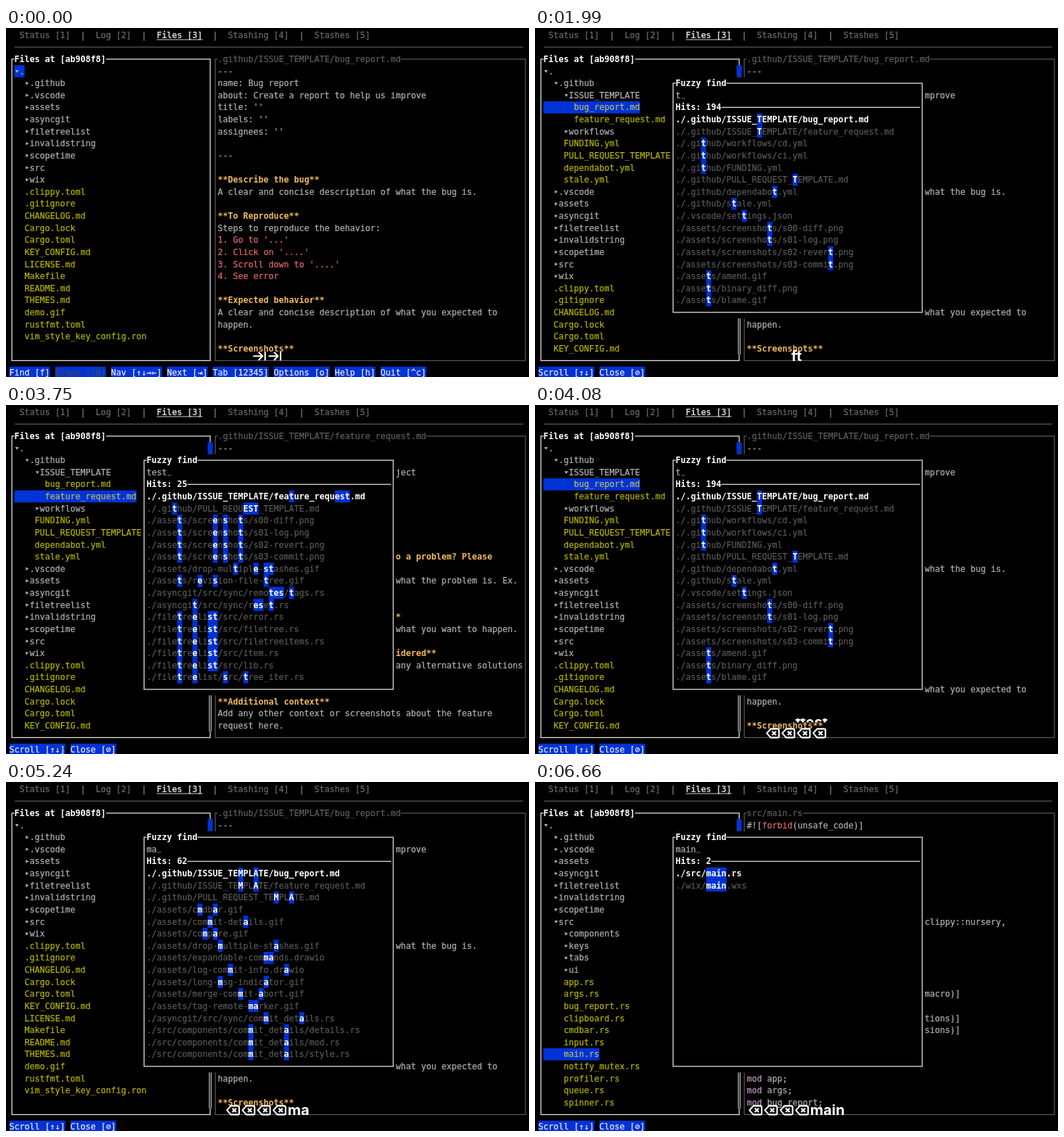
An HTML page that plays this animation: 720 px wide and 481 px high, repeating every 8000 ms.

```html
<!DOCTYPE html>
<html lang="en">
<head>
<meta charset="utf-8">
<title>Fuzzy find</title>
<style>
html, body { margin: 0; width: 100%; height: 100%; overflow: hidden; background: #000; }
svg { display: block; }
#stage { width: 100vw; height: 100vh; }
text { font: 11.63px "DejaVu Sans Mono", monospace; white-space: pre; stroke-width: .2px; }
.b { font-weight: bold; stroke-width: 0; }
.key { font: 700 20px Inter, sans-serif; }
</style>
</head>
<body>
<svg id="stage" viewBox="0 0 720 481"></svg>
<script>
const LOOP = 8000;
const CW = 7, RH = 16.62;
const C = {
  fg: '#b4b4b4', white: '#fff', dim: '#5a5a5a', edge: '#545454', blue: '#0033d6', file: '#b6b600',
  gold: '#f0b95c', red: '#e8686a', violet: '#c39ac3', frame: '#dcdcdc', off: '#3c4668'
};

const trees = {
  top: `v.
 >.github
 >.vscode
 >assets
 >asyncgit
 >filetreelist
 >invalidstring
 >scopetime
 >src
 >wix
 .clippy.toml
 .gitignore
 CHANGELOG.md
 Cargo.lock
 Cargo.toml
 KEY_CONFIG.md
 LICENSE.md
 Makefile
 README.md
 THEMES.md
 demo.gif
 rustfmt.toml
 vim_style_key_config.ron`,
  github: `v.
 v.github
  vISSUE_TEMPLATE
   bug_report.md
   feature_request.md
  >workflows
  FUNDING.yml
  PULL_REQUEST_TEMPLATE.md
  dependabot.yml
  stale.yml
 >.vscode
 >assets
 >asyncgit
 >filetreelist
 >invalidstring
 >scopetime
 >src
 >wix
 .clippy.toml
 .gitignore
 CHANGELOG.md
 Cargo.lock
 Cargo.toml
 KEY_CONFIG.md`,
  assets: `v.
 >.github
 >.vscode
 vassets
  >screenshots
  amend.gif
  binary_diff.png
  blame.gif
  branch-validation.gif
  branches.gif
  by-line-ops.gif
  chars_and_branchname.gif
  checkout-remote.gif
  cmdbar.gif
  commit-details.gif
  commit-msg-length-limit.gif
  compact-tree.png
  compare.gif
  drop-multiple-stashes.gif
  emojified-commit-message.gif
  expandable-commands.drawio
  fuzzy-find.gif
  light-theme.png
  log-commit-info.drawio`,
  src: `v.
 >.github
 >.vscode
 >assets
 >asyncgit
 >filetreelist
 >invalidstring
 >scopetime
 vsrc
  >components
  >keys
  >tabs
  >ui
  app.rs
  args.rs
  bug_report.rs
  clipboard.rs
  cmdbar.rs
  input.rs
  main.rs
  notify_mutex.rs
  profiler.rs
  queue.rs
  spinner.rs`
};

const right = s => ' '.repeat(35) + s;
const docs = {
  bug: ['.github/ISSUE_TEMPLATE/bug_report.md', `---
name: Bug report
about: Create a report to help us improve
title: ''
labels: ''
assignees: ''

---

**Describe the bug**
A clear and concise description of what the bug is.

**To Reproduce**
Steps to reproduce the behavior:
1. Go to '...'
2. Click on '....'
3. Scroll down to '....'
4. See error

**Expected behavior**
A clear and concise description of what you expected to
happen.

**Screenshots**`],
  feature: ['.github/ISSUE_TEMPLATE/feature_request.md', `---
name: Feature request
about: Suggest an idea for this project
title: ''
labels: ''
assignees: ''

---

**Is your feature request related to a problem? Please
describe.**
A clear and concise description of what the problem is. Ex.
I'm always frustrated when [...]

**Describe the solution you'd like**
A clear and concise description of what you want to happen.

**Describe alternatives you've considered**
A clear and concise description of any alternative solutions
or features you've considered.

**Additional context**
Add any other context or screenshots about the feature
request here.`],
  cmdbar: ['assets/cmdbar.gif', 'error loading file: binary file'],
  main: ['src/main.rs', ['#![forbid(unsafe_code)]', '', '', '', '', '', '', '',
    right('clippy::nursery,'), '', '', '', '', '', right('macro)]'), '',
    right('tions)]'), right('sions)]'), '', '', '',
    'mod app;', 'mod args;', 'mod bug_report;'].join('\n')]
};

// Braces mark the matched letters.
const hits = {
  t: [194, `./.github/ISSUE_{T}EMPLATE/bug_report.md
./.github/ISSUE_{T}EMPLATE/feature_request.md
./.gi{t}hub/workflows/cd.yml
./.gi{t}hub/workflows/ci.yml
./.gi{t}hub/FUNDING.yml
./.github/PULL_REQUEST_{T}EMPLATE.md
./.github/dependabo{t}.yml
./.github/s{t}ale.yml
./.vscode/set{t}ings.json
./assets/screensho{t}s/s00-diff.png
./assets/screensho{t}s/s01-log.png
./assets/screenshots/s02-rever{t}.png
./assets/screenshots/s03-commi{t}.png
./asse{t}s/amend.gif
./asse{t}s/binary_diff.png
./asse{t}s/blame.gif`],
  test: [25, `./.github/ISSUE_TEMPLATE/fea{t}ure_requ{est}.md
./.gi{t}hub/PULL_REQU{EST}_TEMPLATE.md
./asse{t}s/scre{e}n{s}ho{t}s/s00-diff.png
./asse{t}s/scre{e}n{s}ho{t}s/s01-log.png
./asse{t}s/scre{e}n{s}ho{t}s/s02-revert.png
./asse{t}s/scre{e}n{s}ho{t}s/s03-commit.png
./assets/drop-mul{t}ipl{e}-{st}ashes.gif
./asse{t}s/r{e}vi{s}ion-file-{t}ree.gif
./asyncgit/src/sync/remo{tes}/{t}ags.rs
./asyncgi{t}/src/sync/r{es}e{t}.rs
./file{t}re{e}li{st}/src/error.rs
./file{t}re{e}li{st}/src/filetree.rs
./file{t}re{e}li{st}/src/filetreeitems.rs
./file{t}re{e}li{st}/src/item.rs
./file{t}re{e}li{st}/src/lib.rs
./file{t}re{e}list/{s}rc/{t}ree_iter.rs`],
  m: [129, `./.github/ISSUE_TEMPLATE/bug_report.{m}d
./.github/ISSUE_TEMPLATE/feature_request.{m}d
./.github/workflows/cd.y{m}l
./.github/workflows/ci.y{m}l
./.github/FUNDING.y{m}l
./.github/PULL_REQUEST_TEMPLATE.{m}d
./.github/dependabot.y{m}l
./.github/stale.y{m}l
./assets/screenshots/s03-com{m}it.png
./assets/a{m}end.gif
./assets/bla{m}e.gif
./assets/chars_and_branchna{m}e.gif
./assets/checkout-re{m}ote.gif
./assets/c{m}dbar.gif
./assets/com{m}it-details.gif
./assets/commit-{m}sg-length-limit.gif`],
  mai: [23, `./assets/c{m}db{a}r.g{i}f
./assets/com{m}it-det{ai}ls.gif
./assets/co{m}p{a}re.g{i}f
./assets/drop-{m}ultiple-st{a}shes.g{i}f
./assets/expandable-com{ma}nds.draw{i}o
./assets/log-com{m}it-info.dr{a}w{i}o
./assets/long-{m}sg-indic{a}tor.g{i}f
./assets/merge-com{m}it-{a}bort.g{i}f
./assets/tag-remote-{ma}rker.g{i}f
./asyncgit/src/sync/com{m}it_det{ai}ls.rs
src/components/commi{t}_detai{ls}/compare_details.rs
./src/components/com{m}it_det{ai}ls/details.rs
./src/components/com{m}it_det{ai}ls/mod.rs
./src/components/com{m}it_det{ai}ls/style.rs
./src/co{m}ponents/bl{a}me_f{i}le.rs
./src/co{m}ponents/br{a}nchl{i}st.rs`],
  main: [2, './src/{main}.rs\n./wix/{main}.wxs']
};

// Derives the hits of a query from the paths of its neighbours.
function derive(query, count, ...from) {
  const paths = from.flatMap(k => hits[k][1].replace(/[{}]/g, '').split('\n'));
  const pattern = stop => new RegExp([...query].map(c => `(${c})`).join(`([^${stop}]*?)`), 'i');
  const near = pattern(query[0] + '/'), far = pattern(query[0]);
  const mark = (m, ...g) => g.slice(0, query.length * 2 - 1).map((s, i) => i % 2 ? s : `{${s}}`).join('');
  const found = [...new Set(paths)]
    .filter(p => p.startsWith('./') && far.test(p))
    .map(p => p.replace(near.test(p) ? near : far, mark));
  hits[query] = [count, found.slice(0, 16).join('\n')];
}
derive('te', 98, 't', 'test');
derive('tes', 41, 'test');
derive('ma', 62, 'm', 'mai');

// Keys: '>' is tab, '<' is backspace.
const steps = [
  [0, { query: null, tree: 'top', sel: '.', doc: 'bug', keys: '>>', bar: false, old: false }],
  [1160, { query: '', keys: '' }],
  [1250, { keys: 'f' }],
  [1990, { query: 't', tree: 'github', sel: 'bug_report.md', bar: true, keys: 'ft' }],
  [2080, { query: 'te', keys: 'fte' }],
  [2160, { query: 'tes', sel: 'feature_request.md', doc: 'feature', keys: 'ftes' }],
  [2240, { query: 'test', keys: 'ftest' }],
  [3750, { keys: '' }],
  [3830, { keys: '<' }],
  [3910, { query: 'tes', keys: '<<' }],
  [4000, { query: 'te', sel: 'bug_report.md', doc: 'bug', keys: '<<<', old: true }],
  [4080, { query: 't', keys: '<<<<' }],
  [4160, { query: '', old: false }],
  [4500, { query: 'm', keys: '<<<<m' }],
  [4580, { tree: 'top', sel: '' }],
  [5240, { query: 'ma', keys: '<<<<ma' }],
  [5910, { query: 'mai', keys: '<<<<mai' }],
  [5990, { tree: 'assets', sel: 'cmdbar.gif', doc: 'cmdbar' }],
  [6580, { query: 'main', keys: '<<<<main' }],
  [6660, { tree: 'src', sel: 'main.rs', doc: 'main' }]
];

const colX = c => 4.6 + c * CW;
const midX = c => colX(c) + CW / 2;
const midY = r => 42.9 + r * RH;
const rect = (x, y, w, h, fill) => `<rect x="${x}" y="${y}" width="${w}" height="${h}" fill="${fill}"/>`;
const cells = (c, r, w, h, fill) => rect(colX(c), midY(r) - RH / 2, w * CW, h * RH, fill);
const line = (x1, y1, x2, y2, color, w = 1.3) =>
  `<path d="M${x1} ${y1}L${x2} ${y2}" stroke="${color}" stroke-width="${w}"/>`;
const ink = color => `fill="${color}" stroke="${color}"`;
const put = (c, r, s, color = C.fg, bold = false) =>
  `<text x="${colX(c)}" y="${midY(r) + 4.1}" ${ink(color)}${bold ? ' class="b"' : ''}>${s}</text>`;

function box(c1, r1, c2, r2, color, title, titleColor, bold) {
  const x = midX(c1), y = midY(r1);
  return `<rect x="${x}" y="${y}" width="${midX(c2) - x}" height="${midY(r2) - y}" fill="none" stroke="${color}" stroke-width="1.3"/>` +
    cells(c1 + 1, r1, title.length, 1, '#000') + put(c1 + 1, r1, title, titleColor, bold);
}

function tabs() {
  const gray = '#6c6c6c';
  let out = '', c = 2;
  ['Status [1]', 'Log [2]', 'Files [3]', 'Stashing [4]', 'Stashes [5]'].forEach((name, i) => {
    if (i) { out += put(c + 2, -2, '|', '#888'); c += 5; }
    const on = i === 2;
    out += put(c, -2, name, on ? '#d0d0d0' : gray, on);
    if (on) out += line(colX(c), 16, colX(c + name.length), 16, '#d0d0d0', 1);
    c += name.length;
  });
  return out + line(12, midY(-1), 712, midY(-1), gray, 1.1);
}

function arrow(c, r, open) {
  const shape = open ? 'M-2.4 -1.6H2.4L0 2.2Z' : 'M-1.8 -2.3V2.3L2.2 0Z';
  return `<path transform="translate(${midX(c)} ${midY(r)})" d="${shape}" fill="${C.fg}"/>`;
}

function fileTree(s) {
  let out = box(0, 0, 39, 25, C.frame, 'Files at [ab908f8]', C.white, true);
  if (s.bar) {
    out += cells(39, 1, 1, 24, '#000') + cells(39, 1, 1, 1, C.blue);
    for (const x of [280, 282.5]) out += line(x, midY(1.5), x, midY(24.5), '#aaa', 1.4);
  }
  trees[s.tree].split('\n').forEach((item, i) => {
    const r = i + 1, depth = item.search(/\S/), c = 1 + depth * 2;
    const raw = item.trim();
    const folder = raw[0] === '>' || (raw[0] === 'v' && !raw.startsWith('vim'));
    const name = folder ? raw.slice(1) : raw;
    const on = name === s.sel;
    if (on) out += cells(1, r, depth * 2 + raw.length, 1, C.blue);
    out += folder ? arrow(c, r, raw[0] === 'v') + put(c + 1, r, name)
      : put(c, r, name, on ? '#bcbc60' : C.file);
  });
  return out;
}

function preview(s) {
  const [title, body] = docs[s.doc];
  const span = color => `<tspan ${ink(color)}>$&</tspan>`;
  let out = box(40, 0, 101, 25, C.edge, title, '#606060');
  body.split('\n').forEach((text, i) => {
    const r = i + 1;
    if (/\*\*/.test(text)) out += put(41, r, text, C.gold, true);
    else if (/^\d\./.test(text)) out += put(41, r, text, C.red);
    else out += put(41, r, text.replace('forbid', span(C.red)).replace(/^mod/, span(C.violet)));
  });
  return out;
}

function popup(query) {
  const found = hits[query], bottom = found ? 21 : 4;
  let out = cells(26, 2, 50, bottom - 1, '#000') +
    box(26, 2, 75, bottom, C.frame, 'Fuzzy find', C.white, true) + put(27, 3, query) +
    rect(colX(27 + query.length) + 1, 96.5, 5, 1, '#777');
  if (!found) return out;
  const title = 'Hits: ' + found[0];
  out += put(27, 4, title, C.white, true) +
    line(colX(27 + title.length), midY(4), 530, midY(4), C.frame);
  found[1].split('\n').forEach((path, i) => {
    let c = 27;
    path.split(/[{}]/).forEach((part, k) => {
      const strong = k % 2 || !i;
      if (k % 2) out += cells(c, i + 5, part.length, 1, C.blue);
      if (part) out += put(c, i + 5, part, strong ? C.white : C.dim, strong);
      c += part.length;
    });
  });
  return out;
}

function commands(open) {
  const names = open ? ['Scroll [↑↓]', 'Close [⊘]']
    : ['Find [f]', 'Blame [⇧B]', 'Nav [↑↓→←]', 'Next [⇥]', 'Tab [12345]', 'Options [o]', 'Help [h]', 'Quit [^c]'];
  let c = 0;
  return names.map(n => {
    const out = cells(c, 26, n.length, 1, C.blue) + put(c, 26, n, n.startsWith('Blame') ? C.off : '#f0f0f0');
    c += n.length + 1;
    return out;
  }).join('');
}

const pen = document.createElement('canvas').getContext('2d');
pen.font = '700 20px Inter, sans-serif';
const icons = {
  '>': 'M1 7H14M8.5 1.5L14 7L8.5 12.5M17.5 1V13',
  '<': 'M1.2 7.2L6.6 1.2H16a2 2 0 0 1 2 2V11.2a2 2 0 0 1 -2 2H6.6ZM8.6 4.5L14 9.9M14 4.5L8.6 9.9'
};
function keycast(s) {
  const pitch = 21.3;
  const marks = s.keys.match(/^[<>]*/)[0], word = s.keys.slice(marks.length);
  const x = 360 - (marks.length * pitch + pen.measureText(word).width) / 2;
  let out = [...marks].map((k, i) =>
    `<path transform="translate(${x + i * pitch + .5} 445.2)" d="${icons[k]}" fill="none" stroke="#fff" stroke-width="2.1" stroke-linejoin="round"/>`).join('');
  if (word) out += `<text class="key" x="${x + marks.length * pitch}" y="459.2" fill="#fff">${word}</text>`;
  if (s.old) out += '<svg x="350" y="432" width="60" height="5.5"><text class="key" x="53" y="11.5" text-anchor="end" fill="#fff">ftest</text></svg>';
  return out;
}

const stage = document.getElementById('stage');
let shown = -1;
function draw(t) {
  const n = steps.filter(([at]) => at <= t).length;
  if (n === shown) return;
  shown = n;
  const s = Object.assign({}, ...steps.slice(0, n).map(e => e[1]));
  const open = s.query !== null;
  stage.innerHTML = rect(0, 0, 720, 481, '#000') + tabs() + preview(s) + fileTree(s) +
    (open ? popup(s.query) : '') + commands(open) + keycast(s);
}

const start = performance.now();
function tick() {
  draw((performance.now() - start) % LOOP);
  requestAnimationFrame(tick);
}
tick();
</script>
</body>
</html>
```
